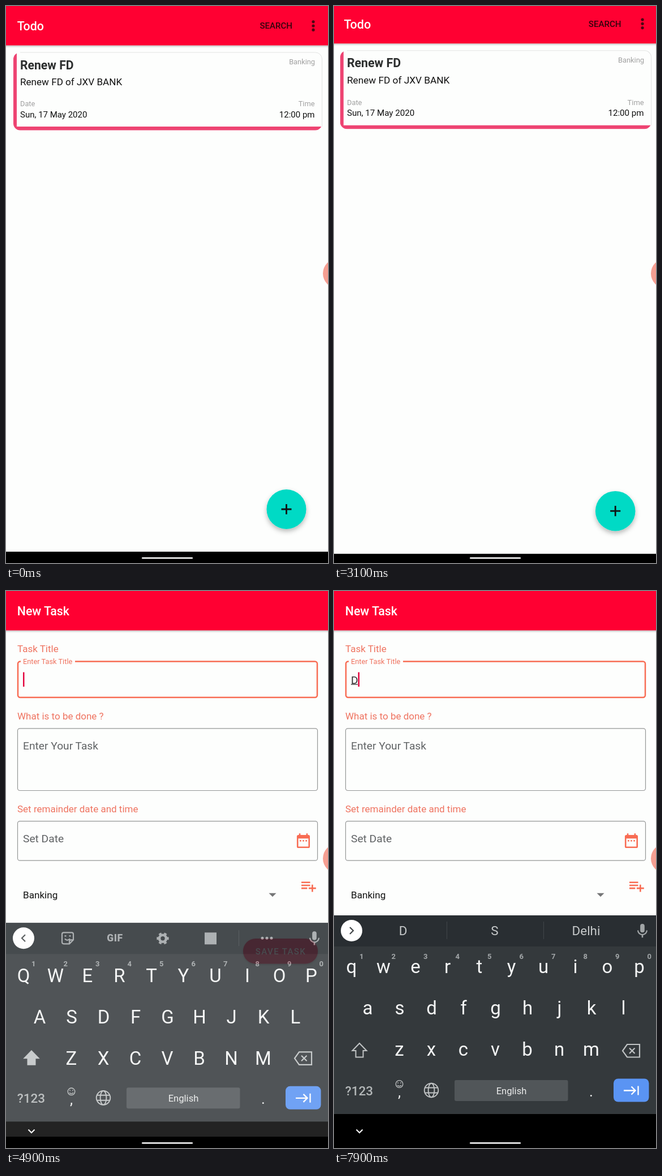
Recreate the animation shown at these times as an HTML page. Size 569 by 984 pixels, loop 8 s.

```html
<!DOCTYPE html>
<html lang="en">
<head>
<meta charset="utf-8">
<title>Todo app</title>
<style>
  html, body { margin: 0; width: 100%; height: 100%; overflow: hidden; background: #fdfefd; }
  svg { display: block; width: 569px; height: 984px; font-family: Roboto, sans-serif; }
  #list, #form { transform-origin: 284.5px 492px; }
  .title { font-size: 21.4px; font-weight: 500; fill: #fff; }
  .caption { font-size: 12.8px; fill: #a0a0a0; }
  .value { font-size: 15px; fill: #111; }
  .heading { font-size: 17px; fill: #ef7360; }
  .hint { font-size: 19.2px; fill: #606365; }
  .box { fill: none; stroke: #949696; stroke-width: 1.2; }
  .accent { fill: #f86c53; }
  .key { font-size: 33px; fill: #f4f5f5; text-anchor: middle; }
  .digit { font-size: 13px; font-weight: 700; fill: #a3a7a9; text-anchor: middle; }
  .word { font-size: 22.4px; fill: #c6c9ca; text-anchor: middle; }
  .soft { fill: #a1a5a7; }
  .line { fill: none; stroke: #c0c3c4; stroke-width: 2.2; }
  .end { text-anchor: end; }
  .mid { text-anchor: middle; }
</style>
</head>
<body>
<svg viewBox="0 0 569 984">
  <defs>
    <filter id="shadow" x="-30%" y="-30%" width="160%" height="170%">
      <feDropShadow dx="0" dy="4" stdDeviation="4" flood-opacity=".28"/>
    </filter>
    <filter id="lift" x="-10%" y="-20%" width="120%" height="160%">
      <feDropShadow dx="0" dy="1.5" stdDeviation="1.5" flood-opacity=".3"/>
    </filter>
    <clipPath id="card"><rect x="13" y="82" width="545.5" height="137.5" rx="12"/></clipPath>
    <g id="page">
      <rect width="569" height="984" fill="#fdfefd"/>
      <rect x="-5" y="-5" width="579" height="74.5" fill="#ff0032" filter="url(#lift)"/>
      <rect y="964" width="569" height="20" fill="#000"/>
    </g>
  </defs>

  <g id="list">
    <use href="#page"/>
    <text class="title" x="19.7" y="43.3">Todo</text>
    <text x="448.5" y="40.3" font-size="15" font-weight="500" fill="#33040d">SEARCH</text>
    <g fill="#4c0713">
      <circle cx="543" cy="27.8" r="2.6"/><circle cx="543" cy="35" r="2.6"/><circle cx="543" cy="42.2" r="2.6"/>
    </g>
    <g clip-path="url(#card)">
      <path d="M13 82h6v131h540v7H13z" fill="#ee4472"/>
    </g>
    <path d="M25 82H546.5a12 12 0 0 1 12 12V213" fill="none" stroke="#e3e4e3"/>
    <text x="25" y="111.5" font-size="21.2" font-weight="700" fill="#2c2e2e">Renew FD</text>
    <text x="25" y="140.2" font-size="17.1" fill="#111">Renew FD of JXV BANK</text>
    <text class="caption end" x="546" y="102.7">Banking</text>
    <text class="caption" x="25" y="177.3">Date</text>
    <text class="caption end" x="545.5" y="177.3">Time</text>
    <text class="value" x="25" y="196.7">Sun, 17 May 2020</text>
    <text class="value end" x="545.5" y="196.7">12:00 pm</text>
    <circle cx="495.5" cy="889" r="35" fill="#00dac5" filter="url(#shadow)"/>
    <path d="M486.5 889h18M495.5 880v18" stroke="#111" stroke-width="2.8"/>
  </g>

  <g id="form">
    <use href="#page"/>
    <text class="title" x="19.7" y="43.3">New Task</text>
    <text class="heading" x="20" y="108">Task Title</text>
    <text class="heading" x="20" y="227.3">What is to be done ?</text>
    <text class="heading" x="20" y="391">Set remainder date and time</text>
    <rect id="idleBox" class="box" x="20.5" y="123.8" width="530" height="64.7" rx="4"/>
    <path id="focusBox" d="M122 124.5H546a4 4 0 0 1 4 4V184a4 4 0 0 1-4 4H25a4 4 0 0 1-4-4V128.500a4 4 0 0 1 4-4h1" fill="none" stroke="#f86c53" stroke-width="2.5"/>
    <text id="label" class="hint" x="30">Enter Task Title</text>
    <text id="typed" x="30" y="163.7" font-size="19.2" fill="#303030">D</text>
    <path id="underline" d="M30 165h12" stroke="#303030" stroke-width="1.3"/>
    <rect id="cursor" y="143.500" width="2.5" height="25.5" fill="#e4053f"/>
    <rect class="box" x="20.5" y="242.8" width="530" height="109.7" rx="4"/>
    <text class="hint" x="30" y="280">Enter Your Task</text>
    <rect class="box" x="20.5" y="406.6" width="530" height="69.6" rx="4"/>
    <text class="hint" x="30" y="443.7">Set Date</text>
    <path class="accent" transform="translate(510.1 425.800) scale(1.28)" d="M9 11H7v2h2zm4 0h-2v2h2zm4 0h-2v2h2zm2-7h-1V2h-2v2H8V2H6v2H5a2 2 0 0 0-2 2v14a2 2 0 0 0 2 2h14a2 2 0 0 0 2-2V6a2 2 0 0 0-2-2zm0 16H5V9h14z"/>
    <path class="accent" transform="translate(519.4 505.8) scale(1.29)" d="M14 10H2v2h12zm0-4H2v2h12zm4 8v-4h-2v4h-4v2h4v4h2v-4h4v-2zM2 16h8v-2H2z"/>
    <text x="30" y="543" font-size="17.1" fill="#111">Banking</text>
    <path d="M464.5 533.7h13l-6.5 6.5z" fill="#757677"/>
    <rect x="419" y="614" width="132" height="44.5" rx="22" fill="#ff0032" filter="url(#lift)"/>
    <text class="mid" x="485.5" y="642" font-size="15" font-weight="500" letter-spacing="1.4" fill="#fff">SAVE TASK</text>
  </g>

  <g id="keyboard">
    <rect y="573" width="569" height="352" fill="#34393c"/>
    <rect y="573" width="569" height="55" fill="#292e32"/>
    <rect y="924" width="569" height="110" fill="#000"/>
    <circle cx="31" cy="600" r="19" fill="#fff"/>
    <path id="chevron" fill="none" stroke="#44484a" stroke-width="2.2"/>
    <path class="soft" transform="translate(529.6 585.4) scale(1.28)" d="M12 14a3 3 0 0 0 3-3V5a3 3 0 0 0-6 0v6a3 3 0 0 0 3 3zm5.300-3a5.300 5.100 0 0 1-10.600 0H5c0 3.400 2.700 6.200 6 6.700V21h2v-3.300c3.300-.5 6-3.300 6-6.700z"/>
    <g id="tools">
      <path d="M102 590h14a3 3 0 0 1 3 3v10l-7 7h-10a3 3 0 0 1-3-3v-14a3 3 0 0 1 3-3zM119 603h-4a3 3 0 0 0-3 3v4M104 601q4 5 9 0M103.500 596h3M111.500 596h3" fill="none" stroke="#a1a5a7" stroke-width="2.2"/>
      <text class="soft mid" x="192.500" y="606" font-size="17.500" font-weight="900" letter-spacing=".6">GIF</text>
      <g fill="none" stroke="#a1a5a7">
        <circle cx="277" cy="600.500" r="6" stroke-width="4.600"/>
        <circle cx="277" cy="600.500" r="9.200" stroke-width="3" pathLength="12" stroke-dasharray="1" stroke-dashoffset=".5"/>
      </g>
      <rect class="soft" x="351" y="590" width="21" height="21"/>
      <path d="M411.500 586v28" stroke="#41464a"/>
      <g class="soft"><circle cx="453" cy="600" r="2.500"/><circle cx="461" cy="600" r="2.500"/><circle cx="469" cy="600" r="2.500"/></g>
    </g>
    <g id="words">
      <text class="word" x="122" y="608">D</text>
      <text class="word" x="284" y="608">S</text>
      <text class="word" x="445.500" y="608">Delhi</text>
      <path d="M199.500 584v31M370.500 584v31" stroke="#41464a"/>
    </g>
    <g id="upper"></g>
    <g id="lower"></g>
    <g id="digits"></g>
    <path id="shift" d="M45 799l12.500 13h-6v11.500h-13V812h-6z" stroke="#c0c3c4" stroke-width="2"/>
    <path class="line" d="M518 801h22v22.500h-22l-8-11.200zM522 807.500l9.500 9.500M531.500 807.500l-9.500 9.500"/>
    <text class="mid" x="44.500" y="890.500" font-size="22.500" font-weight="500" fill="#b3b7b8">?123</text>
    <g fill="none" stroke="#c0c3c4" stroke-width="1.300">
      <circle cx="115.500" cy="871" r="6.300"/><path d="M112 873q3.500 3.500 7 0M113 868v2M118 868v2"/>
    </g>
    <text class="mid" x="115.500" y="894" font-size="26" fill="#f0f1f1">,</text>
    <g fill="none" stroke="#c0c3c4" stroke-width="1.900">
      <circle cx="172" cy="882" r="12.300"/><ellipse cx="172" cy="882" rx="5.400" ry="12.300"/><path d="M161 877.500h22M161 886.500h22"/>
    </g>
    <rect x="213" y="864" width="200.500" height="37" rx="3" fill="#515659"/>
    <text class="mid" x="313.500" y="888.500" font-size="16.600" fill="#eceded">English</text>
    <text class="mid" x="454.500" y="893" font-size="26" fill="#f0f1f1">.</text>
    <rect x="494" y="861.500" width="62.500" height="41" rx="8" fill="#5a94f3"/>
    <path d="M512 882.500h20M525.500 875.500l7 7-7 7M537.500 874.500v16" fill="none" stroke="#fff" stroke-width="2.300"/>
    <path d="M39.500 951.500l5.500 5.500 5.500-5.500" transform="translate(0 0)" id="hide" fill="none" stroke="#fff" stroke-width="2"/>
  </g>

  <circle cx="586" cy="472.500" r="26" fill="#f59f92"/>
  <rect x="240" y="974" width="90" height="2.500" rx="1.200" fill="#fff"/>
</svg>
<script>
const el = {};
document.querySelectorAll('svg [id]').forEach(node => el[node.id] = node);

const LOOP = 8000, OPEN = 3067, FOCUS = 4700, BLINK = 4760, RISE = 4815, TYPE = 7500;
const clamp = v => Math.min(1, Math.max(0, v));
const mix = (a, b, p) => a + (b - a) * p;
const show = (node, on) => node.setAttribute('display', on ? 'inline' : 'none');

const label = (cls, x, y, s) => `<text class="${cls}" x="${x}" y="${y}">${s}</text>`;
const rows = [['QWERTYUIOP', 31], ['ASDFGHJKL', 59.5], ['ZXCVBNM', 115.5]];
const keys = (convert, base) => rows.map(([letters, x], r) =>
  [...letters].map((c, i) => label('key', x + 56.5 * i, base + 73.3 * r, convert(c))).join('')).join('');
el.upper.innerHTML = keys(c => c, 677.5);
el.lower.innerHTML = keys(c => c.toLowerCase(), 674.7);
el.digits.innerHTML = [...'1234567890'].map((c, i) => label('digit', 48.700 + 56.5 * i, 650, c)).join('');

// Quick start, very long settle
const slowIn = x => x < 1 / 6 ? 0.4 * (6 * x) ** 3 : 1 - 0.6 * ((1 - x) * 1.2) ** 10;

function draw(t) {
  const open = slowIn(clamp((t - OPEN) / 400));
  el.list.style.transform = `scale(${mix(1, 1.15, open)})`;
  el.form.style.transform = `scale(${mix(0.85, 1, open)})`;
  el.form.style.opacity = clamp((t - OPEN - 50) / 50);

  const focused = t >= FOCUS, typed = t >= TYPE;
  const p = clamp((t - FOCUS) / 167), float = p * p * (3 - 2 * p);
  show(el.idleBox, !focused);
  show(el.focusBox, focused);
  el.label.setAttribute('y', mix(162.3, 129, float));
  el.label.style.fontSize = mix(19.2, 12.8, float) + 'px';
  el.label.style.fill = focused ? '#ef7360' : '';

  const blinkStart = typed ? TYPE : BLINK;
  show(el.cursor, t >= blinkStart && (t - blinkStart) % 1000 < 500);
  el.cursor.setAttribute('x', typed ? 42.5 : 30);
  show(el.typed, typed);
  show(el.underline, typed);

  const rest = 1 - clamp((t - RISE) / 200), drop = 41 * rest * rest;
  el.keyboard.setAttribute('transform', `translate(0 ${drop})`);
  el.keyboard.style.opacity = 1 - rest ** 3.5;
  el.hide.setAttribute('transform', `translate(0 ${-drop})`);
  show(el.tools, !typed);
  show(el.upper, !typed);
  show(el.words, typed);
  show(el.lower, typed);
  el.shift.setAttribute('fill', typed ? 'none' : '#c0c3c4');
  el.chevron.setAttribute('d', typed ? 'M28 594l6 6-6 6' : 'M34 594l-6 6 6 6');
}

function tick() {
  draw(performance.now() % LOOP);
  requestAnimationFrame(tick);
}
tick();
</script>
</body>
</html>
```
